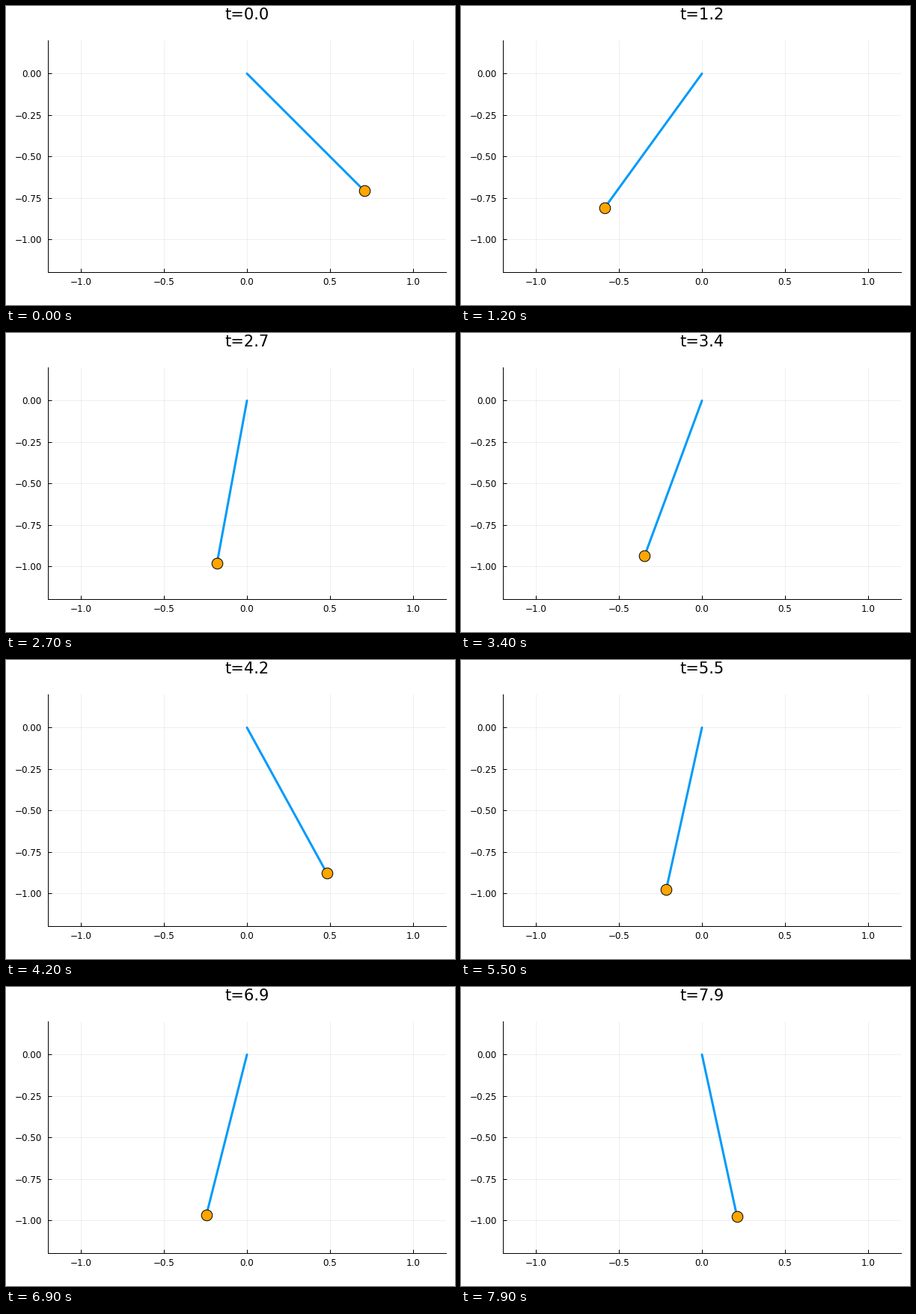
These frames come from a looping animation (600 px wide and 400 px high, 8 s). A matplotlib script:

```python
import numpy as np
import matplotlib.pyplot as plt
from matplotlib.animation import FuncAnimation

W, H, DPI = 600, 400, 100
PT = 72 / DPI                      # points per pixel
FRAMES, STEP = 80, 0.1
GRAVITY, DAMPING = 9.8, 0.2

plt.rcParams["font.family"] = "DejaVu Sans"


def slope(s):
    angle, speed = s
    return np.array([speed, -GRAVITY * np.sin(angle) - DAMPING * speed])


def swing(n, dt, sub=20):
    """Angles of a damped pendulum, integrated with RK4."""
    s, h = np.array([np.pi / 4, 0.0]), dt / sub
    angles = []
    for _ in range(n):
        angles.append(s[0])
        for _ in range(sub):
            a = slope(s)
            b = slope(s + h / 2 * a)
            c = slope(s + h / 2 * b)
            d = slope(s + h * c)
            s = s + h / 6 * (a + 2 * b + 2 * c + d)
    return np.array(angles)


angles = swing(FRAMES, STEP)

fig = plt.figure(figsize=(W / DPI, H / DPI), dpi=DPI, facecolor="white")
left, right, top, bottom = 56, 588, 46.1, 356.4
ax = fig.add_axes([left / W, 1 - bottom / H, (right - left) / W, (bottom - top) / H])
ax.set(xlim=(-1.2, 1.2), ylim=(-1.2, 0.2))
ax.set_xticks(np.arange(-1, 1.1, 0.5))
ax.set_yticks(np.arange(-1, 0.1, 0.25))
ax.xaxis.set_major_formatter("{x:.1f}")
ax.yaxis.set_major_formatter("{x:.2f}")
ax.tick_params(direction="in", length=5 * PT, width=PT, labelsize=12 * PT)
ax.tick_params(axis="x", pad=6.5 * PT)
ax.tick_params(axis="y", pad=8 * PT)
ax.grid(color="black", alpha=0.1, linewidth=0.6 * PT)
ax.set_axisbelow(True)
for side in ("top", "right"):
    ax.spines[side].set_visible(False)
for side in ("left", "bottom"):
    ax.spines[side].set_linewidth(PT)

title = fig.text((left + right) / 2 / W, 1 - 18 / H, "", size=21 * PT,
                 ha="center", va="baseline")
rod, = ax.plot([], [], color="#009afa", lw=3 * PT, solid_capstyle="round", zorder=3)
bob, = ax.plot([], [], "o", ms=14.6 * PT, mfc="orange", mec="black", mew=PT, zorder=4)


def draw(i):
    x, y = np.sin(angles[i]), -np.cos(angles[i])
    rod.set_data([0, x], [0, y])
    bob.set_data([x], [y])
    title.set_text(f"t={i * STEP:.1f}")
    return rod, bob, title


anim = FuncAnimation(fig, draw, frames=FRAMES, interval=1000 * STEP,
                     repeat=True, repeat_delay=0)
plt.show()
```
